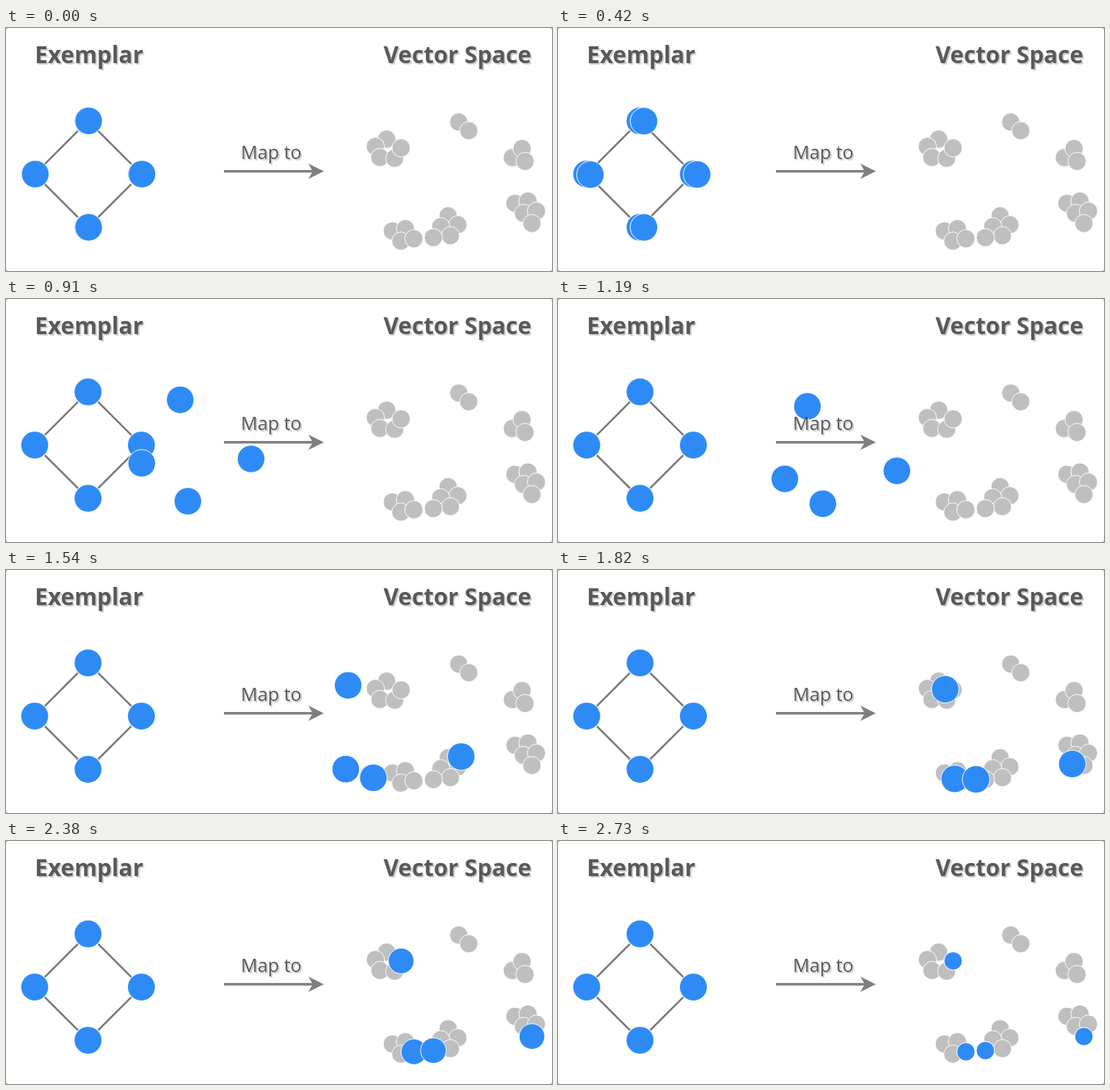
An HTML page that plays this animation: 744 by 332 pixels, repeating every 3850 ms.

```html
<!DOCTYPE html>
<html lang="en">
<head>
<meta charset="utf-8">
<title>Exemplar to vector space</title>
<style>
  html, body { margin: 0; width: 100%; height: 100%; overflow: hidden; background: #fff; }
  svg { display: block; width: 744px; height: 332px; }
  text { font-family: "Open Sans", "Noto Sans", sans-serif; fill: #595959; }
  .head { font-size: 31.5px; font-weight: 700; }
  .label { font-size: 25.2px; font-weight: 500; }
  .shade { fill: #cfcfcf; }
  .blue { fill: #2e8bf6; }
  .gray { fill: #bfbfbf; }
  .dot { stroke: #fff; stroke-width: 1; }
  .edge { stroke: #777; stroke-width: 2.6; }
</style>
</head>
<body>
<svg viewBox="0 0 744 332">
  <rect width="744" height="332" fill="#999"/>
  <rect width="744" height="332" rx="3" fill="#fff"/>
  <g id="graph"></g>
  <g id="space"></g>
  <g id="movers"></g>
  <g id="arrow">
    <path d="M297 195.7H419" stroke="#7f7f7f" stroke-width="3.6"/>
    <path d="M412 185.2L433 195.7L412 206.2L418 195.7Z" fill="#7f7f7f"/>
  </g>
  <g id="labels"></g>
</svg>
<script>
const LOOP = 3850, STEP = 70;
const TRAVEL = { start: 305, length: 1691, ramp: 0.312 };
const SHRINK = { start: 2240, length: 490 };
const BIG = 18.7, SMALL = 12.4, NODE = 18.4, SPACING = 18;

const $ = id => document.getElementById(id);
const clamp = x => Math.min(1, Math.max(0, x));
const mix = (a, b, k) => a + (b - a) * k;
const smooth = x => x * x * (3 - 2 * x);
const times = (n, make) => Array.from({ length: n }, (_, i) => make(i));

function polar([x, y], degrees, rx, ry = rx) {
  const a = degrees * Math.PI / 180;
  return [x + rx * Math.cos(a), y + ry * Math.sin(a)];
}

// Two staggered rows of touching dots, heading along `turn`
function strip(x, y, n, turn, spread = 60) {
  return times(n, i => {
    const along = polar([x, y], turn, SPACING * (i >> 1));
    return polar(along, turn - spread, SPACING * (i % 2));
  });
}

// Dots around an oval, ending just above its right side
const fan = (x, y, n) => times(n, i => polar([x, y], -8 + 68 * (n - 1 - i), 18, 14));

// Corners of the diamond, clockwise from the left
const nodes = times(4, i => polar([111.8, 199.6], 180 + 90 * i, 72.7));

// Each node lands on the last dot of the cluster with the same index
const clusters = [
  strip(526.5, 277.3, 4, 50),
  fan(520.6, 165.8, 5),
  strip(693.5, 239.5, 5, 50),
  strip(602.5, 256.5, 5, 124, 81),
  strip(617, 128.5, 2, 101),
  strip(690, 177, 3, 17)
];

function add(parent, tag, attrs, text) {
  const el = document.createElementNS("http://www.w3.org/2000/svg", tag);
  for (const key in attrs) el.setAttribute(key, attrs[key]);
  if (text) el.textContent = text;
  return parent.appendChild(el);
}

function circle(parent, [cx, cy], r, cls) {
  return add(parent, "circle", { cx, cy, r, class: cls });
}

function label(x, y, text, cls) {
  add($("labels"), "text", { x: x + 2, y: y + 2, class: cls + " shade", "aria-hidden": true }, text);
  add($("labels"), "text", { x, y, class: cls }, text);
}

// Constant acceleration, steady speed, constant braking
function ramped(u, a) {
  const peak = 1 / (1 - a);
  if (u < a) return peak * u * u / (2 * a);
  if (u > 1 - a) return 1 - peak * (1 - u) ** 2 / (2 * a);
  return peak * (u - a / 2);
}

nodes.forEach(([x1, y1], i) => {
  const [x2, y2] = nodes[(i + 1) % nodes.length];
  const gap = 19.5 / Math.hypot(x2 - x1, y2 - y1);
  add($("graph"), "line", {
    x1: mix(x1, x2, gap), y1: mix(y1, y2, gap),
    x2: mix(x2, x1, gap), y2: mix(y2, y1, gap), class: "edge"
  });
});
nodes.forEach(p => circle($("graph"), p, NODE, "blue"));
clusters.flat().forEach(p => circle($("space"), p, SMALL, "gray dot"));

const movers = nodes.map(([x, y], i) => {
  const from = [x + 0.8, y], to = clusters[i].at(-1);
  const reach = Math.hypot(to[0] - x, to[1] - y);
  // Longer trips set off slightly later
  const start = TRAVEL.start + (reach - 426) / 7;
  return { from, to, start, el: circle($("movers"), from, BIG, "blue dot") };
});

label(39.3, 48, "Exemplar", "head");
label(514.5, 48, "Vector Space", "head");
label(320, 179, "Map to", "label");

function draw(time) {
  const t = Math.floor((time % LOOP) / STEP) * STEP;
  const fit = smooth(clamp((t - SHRINK.start) / SHRINK.length));
  for (const { el, from, to, start } of movers) {
    const go = ramped(clamp((t - start) / TRAVEL.length), TRAVEL.ramp);
    el.setAttribute("cx", mix(from[0], to[0], go));
    el.setAttribute("cy", mix(from[1], to[1], go));
    el.setAttribute("r", mix(BIG, SMALL, fit));
  }
}

const origin = performance.now();
function tick() {
  draw(performance.now() - origin);
  requestAnimationFrame(tick);
}
tick();
</script>
</body>
</html>
```
